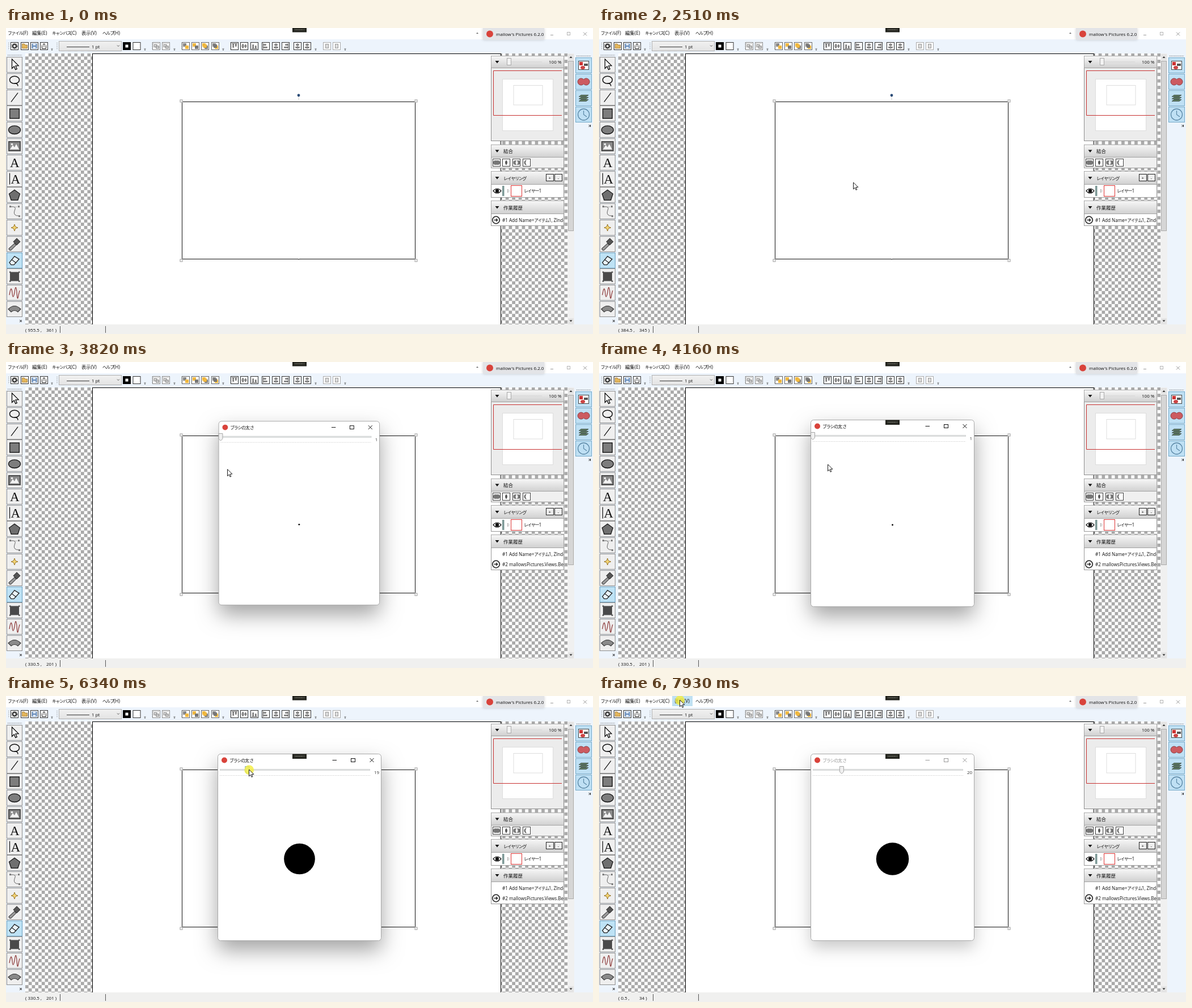
An HTML page with a canvas that plays this animation: 1035 px wide and 541 px high, repeating every 8000 ms.

```html
<!DOCTYPE html>
<html lang="ja">
<head>
<meta charset="utf-8">
<title>Brush size</title>
<style>
html, body { margin: 0; width: 100%; height: 100%; overflow: hidden; background: #fff; }
canvas { display: block; }
</style>
</head>
<body>
<canvas id="stage" width="1035" height="541"></canvas>
<script>
const W = 1035, H = 541, LOOP = 8000, STEP = 69.5;
const screen2d = document.getElementById('stage').getContext('2d');
let g = screen2d;

// ---------- helpers ----------
function box(x, y, w, h, fill, stroke, lw = 1) {
  if (fill) { g.fillStyle = fill; g.fillRect(x, y, w, h); }
  if (stroke) {
    g.strokeStyle = stroke; g.lineWidth = lw;
    g.strokeRect(x + lw / 2, y + lw / 2, w - lw, h - lw);
  }
}
function paint(fill, stroke, lw = 1) {
  if (fill) { g.fillStyle = fill; g.fill(); }
  if (stroke) { g.strokeStyle = stroke; g.lineWidth = lw; g.stroke(); }
}
function poly(pts, fill, stroke, lw) {
  g.beginPath();
  for (let i = 0; i < pts.length; i += 2) g.lineTo(pts[i], pts[i + 1]);
  if (fill) g.closePath();
  paint(fill, stroke, lw);
}
function oval(x, y, rx, ry, fill, stroke, lw) {
  g.beginPath();
  g.ellipse(x, y, rx, ry, 0, 0, 7);
  paint(fill, stroke, lw);
}
function curve(d, fill, stroke, lw, x = 0, y = 0) {
  g.save();
  g.translate(x, y);
  const p = new Path2D(d);
  if (fill) { g.fillStyle = fill; g.fill(p); }
  if (stroke) { g.strokeStyle = stroke; g.lineWidth = lw || 1; g.stroke(p); }
  g.restore();
}
function dots(x1, y1, x2, y2, color, gap = 1.5) {
  g.setLineDash([1.2, gap]);
  poly([x1, y1, x2, y2], null, color);
  g.setLineDash([]);
}
// Kana are set smaller and tighter than the rest, as in a UI font.
function text(s, x, y, size = 8.1, color = '#111') {
  g.fillStyle = color;
  for (const run of s.match(/[\u3040-\u30ff]+|[^\u3040-\u30ff]+/g)) {
    const kana = /[\u3040-\u30ff]/.test(run);
    g.font = `${kana ? size * 0.92 : size}px "Open Sans", "Noto Sans CJK JP", sans-serif`;
    g.letterSpacing = kana ? '-1.1px' : '0px';
    g.fillText(run, x, y + 3);
    x += g.measureText(run).width;
  }
  g.letterSpacing = '0px';
}
function shade(y1, y2, a, b) {
  const s = g.createLinearGradient(0, y1, 0, y2);
  s.addColorStop(0, a);
  s.addColorStop(1, b);
  return s;
}
function pointer(x, y, k = 0.72) {
  g.save();
  g.translate(x + 0.5, y);
  g.scale(k, k);
  poly([0, 0, 0, 16.5, 3.8, 12.9, 6.3, 18.6, 8.8, 17.5, 6.4, 11.9, 11.6, 11.6], '#fff', '#000', 1.25);
  g.restore();
}
function blackTab(y) {
  box(505, y, 25, 8.5, '#22231d');
  box(508, y + 2.5, 19, 3, '#3c3d36');
  dots(511, y + 4, 524, y + 4, '#85867c', 2);
}

// ---------- static window ----------
function checker() {
  const c = 5.76;
  box(34, 44, 956, 480, '#fff');
  g.save();
  g.beginPath();
  g.rect(34, 45, 956, 480);
  g.clip();
  g.fillStyle = '#a9a9a9';
  for (let r = 0; r < 84; r++)
    for (let i = (r + 1) % 2; i < 167; i += 2) g.fillRect(34 + i * c, 44.6 + r * c, c, c);
  g.restore();
}

function titleBar() {
  box(0, 0, W, 20, '#fff');
  text('ファイル(F)', 3, 9, 8.4);
  text('編集(E)', 46, 9, 8.4);
  text('キャンバス(C)', 81, 9, 8.4);
  text('表示(V)', 133, 9, 8.4);
  text('ヘルプ(H)', 170, 9, 8.4);
  blackTab(-1);
  poly([829, 10, 831, 8, 833, 10], '#555');
}

function toolBar() {
  box(0, 20, W, 25, '#edf4fc');
  g.save();
  g.shadowColor = 'rgba(0,0,0,.18)';
  g.shadowBlur = 5;
  box(841, 0, 108, 21, '#e3e4e7');
  g.restore();
  oval(853, 10.5, 6, 6, '#d9433b');
  text("mallow's Pictures 6.2.0", 864, 10.5, 8, '#111');
  poly([960, 12.5, 965, 12.5], null, '#999');
  box(989, 7, 6, 6, null, '#b5b5b5');
  curve('M0 0l6 6M6 0l-6 6', null, '#999', 1, 1018, 7.5);

  for (const x of [5, 90, 258, 310, 396]) dots(x, 26, x, 39, '#777', 2);
  for (const x of [81, 245, 297, 383, 546, 598]) {
    poly([x - 1.5, 36.5, x + 1.5, 36.5], null, '#555', 0.8);
    poly([x - 1.5, 38, x + 1.5, 38, x, 39.8], '#333');
  }
  const frame = (x, c = '#333') => box(x - 7, 25, 14, 14, '#fff', c);
  for (const x of [15, 33, 50, 67]) frame(x);
  oval(15, 32, 3, 3, null, '#333', 2);
  g.setLineDash([1.5, 1.5]);
  oval(15, 32, 4.6, 4.6, null, '#333', 1.4);
  g.setLineDash([]);
  curve('M0 0h4l1 2h4v6h-9z', '#e3b65c', '#8a6420', 0.7, 28.5, 28);
  box(45.5, 27.5, 9, 9, '#5d84b5');
  box(47.5, 28, 5, 3, '#dfe9f5');
  box(47.5, 33, 5, 3, '#dfe9f5');
  curve('M0 3v6h7v-6M3.5 6v-6M1.5 2l2-2l2 2', null, '#222', 1, 63.5, 27.5);

  box(93, 23, 111, 18, shade(23, 41, '#f1f1f1', '#e3e3e3'), '#b0b0b0');
  poly([107, 33.5, 147, 33.5], null, '#222', 0.9);
  text('1 pt', 151, 33, 8);
  poly([196, 30.5, 198, 32.5, 200, 30.5], null, '#444', 0.9);
  box(206, 25, 14, 14, '#000');
  box(210.5, 29.5, 5, 5, '#fff');
  frame(230.5);

  for (const x of [265, 282]) {
    frame(x, '#888');
    dots(x - 5, 27.5, x + 5, 27.5, '#777');
    box(x - 4.5, 29, 6, 5, '#ddd', '#888');
    box(x - 1, 31.5, 6, 5, '#ccc', '#888');
  }
  [317, 334, 351, 369].forEach((x, i) => {
    frame(x, '#666');
    box(x - 5, 27, 6, 6, i % 3 ? '#f0b840' : '#888');
    box(x - 1, 31, 6, 6, i % 3 ? '#777' : '#f0b840');
    if (i > 1) box(x - 3, 29, 6, 6, i === 3 ? '#777' : '#f0b840');
  });
  [403, 420, 438, 458, 476, 493, 514, 531].forEach((x, i) => {
    frame(x);
    g.save();
    g.translate(x, 32);
    if (i > 2) g.rotate(-Math.PI / 2);
    const e = i > 5 ? 0 : [-4.5, 0, 4.5][i % 3];
    const top = h => e < 0 ? -4.5 : e > 0 ? 4.5 - h : -h / 2;
    poly([-5, e, 5, e], null, '#444', 0.8);
    box(-3.5, top(7), 2.5, 7, '#aaa', '#555', 0.7);
    box(1, top(5), 2.5, 5, '#aaa', '#555', 0.7);
    g.restore();
  });
  for (const x of [566, 583]) {
    frame(x, '#aaa');
    box(x - 3, 28, 6, 8, '#ddd', '#999');
  }
}

function letter(x, y) {
  g.fillStyle = '#111';
  g.font = '23px "Liberation Serif", serif';
  g.fillText('A', x, y + 8);
}
function toolIcons() {
  const icons = [
    y => pointer(10, y - 10, 1),
    y => { oval(15, y - 2, 8.5, 6.5, null, '#111', 1.5); curve('M1 4q6 0 6 5', null, '#111', 1.4, 14, y); },
    y => poly([9, y + 8, 21, y - 8], null, '#111', 1.2),
    y => box(6, y - 9, 18, 18, '#7d7d7d', '#111', 1.3),
    y => oval(15, y, 10.5, 7.3, '#7d7d7d', '#111', 1.3),
    y => {
      box(4, y - 9, 22, 18, '#4a4a4a');
      box(6, y - 7, 18, 14, '#8a8a8a');
      poly([7, y + 5.5, 12, y - 2, 15, y + 2, 18, y - 4, 23, y + 5.5], '#f4f4f4');
      oval(10.5, y - 3.5, 1.8, 1.8, '#f4f4f4');
    },
    y => letter(7, y),
    y => { letter(8.5, y); poly([6.5, y - 10, 6.5, y + 10], null, '#111', 1.2); },
    y => {
      const p = [];
      for (let a = 0; a < 5; a++) p.push(15 + 10 * Math.sin(a * 1.2566), y + 0.8 - 10 * Math.cos(a * 1.2566));
      poly(p, '#6f6f6f', '#111', 1.2);
    },
    y => {
      curve('M-8 -8q13 -2 8 7q-3 9 8 9', null, '#666', 1, 15, y);
      poly([7, y - 8, 20, y - 8], null, '#999', 0.7);
      for (const [a, b] of [[-9, -10], [6, -10], [7, 7]]) box(15 + a, y + b, 3, 3, '#fff', '#777');
    },
    y => curve('M0 -6l1.6 4.4l4.4 1.6l-4.4 1.6l-1.6 4.4l-1.6 -4.4l-4.4 -1.6l4.4 -1.6z', '#f7d774', '#9c7a2c', 1, 15, y),
    y => { curve('M-1 -4l6 -6l6 6l-6 6z', '#555', '#222', 1, 14, y); curve('M1 -1l3 3l-9 9q-4 1 -4 -3z', '#999', '#222', 1, 14, y); },
    y => { curve('M-9 4l9 -11l8 5l-9 10h-5z', '#e9f4fb', '#222', 1.4, 15, y); poly([10, y - 1, 18, y + 5], null, '#222', 1.2); },
    y => {
      box(7, y - 8, 16, 16, '#4a4a4a');
      for (const a of [-9, 7]) for (const b of [-9, 7]) box(15 + a, y + b, 2.5, 2.5, '#555');
    },
    y => curve('M-9 4q3 -20 5 -4q1 14 4 0q2 -18 4 -2q1 20 3 6l2 -8', null, '#8a3434', 1.2, 15, y),
    y => curve('M-11 2q11 -11 22 0l-5 5q-6 -5 -12 0z', '#8a8a8a', '#333', 1.1, 15, y - 2)
  ];
  icons.forEach((icon, i) => {
    const y = 51 + 28.8 * i, on = i === 12;
    box(1, Math.round(y), 28, 28, on ? '#bee2f5' : '#efefef', on ? '#6c9fbd' : '#8d8d8d');
    icon(y + 14);
  });
}

function sideBars() {
  box(0, 45, 34, 480, '#edf4fc');
  dots(3, 48, 28, 48, '#555');
  toolIcons();
  box(1002, 45, 33, 480, '#edf4fc');
  dots(1006, 49.5, 1031, 49.5, '#555');
  for (let i = 0; i < 4; i++) box(1004, 52 + 29 * i, 29, 28, '#bfe0f4', '#73a9c8');
  box(1009, 58, 19, 16, '#fff', '#444');
  box(1011, 60, 6, 6, '#c33');
  box(1019, 63, 7, 4, '#555');
  oval(1017, 70, 4, 3, '#c44');
  oval(1014, 95, 6, 6, '#cc5b60', '#8c3a3f');
  oval(1023, 95, 6, 6, '#cc5b60', '#8c3a3f');
  box(1014, 91, 9, 8, '#cc5b60');
  for (const y of [128, 124, 120]) curve('M0 0l4 -3h13l-4 3z', '#5c7a60', '#3d4a40', 0.8, 1010, y + 1.5);
  oval(1018.5, 153, 10, 10, null, '#5a87a5', 1.3);
  poly([1018.5, 146, 1018.5, 153, 1024, 157], null, '#5a87a5', 1.2);
  for (const [x, y] of [[24, 518], [1027.5, 173]])
    curve('M0 -2l2 2l-2 2M3 -2v4', null, '#222', 1, x, y);

  box(990, 45, 12, 479, '#f0f0f0');
  box(991, 58, 10, 301, '#d6d6d6', '#ababab');
  box(991, 46, 10, 11, '#e4e4e4');
  box(991, 513, 10, 11, '#e4e4e4');
  poly([993.5, 53, 996, 50, 998.5, 53], '#333');
  poly([993.5, 516.5, 996, 519.5, 998.5, 516.5], '#333');
}

function page() {
  box(152, 45, 721, 490, '#fff', '#000');
  box(310, 130, 412, 279, null, '#111');
  for (const x of [309, 723]) for (const y of [129, 411]) box(x - 2.5, y - 2.5, 5, 5, '#fff', '#999');
  dots(516, 121, 516, 129, '#999');
  oval(516, 119, 2.4, 2.4, '#2b4c78');
  box(515.5, 408, 1.5, 2, '#777');
}

function header(y, h, label) {
  box(855, y, 129, h, shade(y, y + h, '#f8f8f8', '#cfcfcf'), '#999', 0.8);
  poly([862.5, y + h / 2 - 2, 869.5, y + h / 2 - 2, 866, y + h / 2 + 2.5], '#111');
  if (label) text(label, 877, y + h / 2 + 0.5, 8.5);
}
function panels() {
  box(855, 70, 129, 130, '#ececec', '#8d8d8d');
  header(49, 22);
  box(884, 59, 61, 2, '#dcdcdc');
  box(883, 53, 8, 13, '#f2f2f2', '#aaa');
  text('100 %', 957, 60, 8);
  box(875, 90, 90, 92, '#fff', '#ddd');
  box(894.5, 101, 52, 35.5, null, '#ddd');
  poly([980, 75.5, 859.5, 75.5, 859.5, 154.5, 980, 154.5], null, '#c83030');

  box(855, 228, 129, 20, '#f0f0f0', '#999');
  header(206, 23, '結合');
  for (const x of [865, 882, 900, 918]) box(x - 7, 231, 14, 14, '#fff', '#444');
  oval(863, 238, 4, 4, '#777');
  oval(867, 238, 4, 4, '#777');
  curve('M0 -4.5q4 4.5 0 9q-4 -4.5 0 -9z', '#555', null, 1, 882, 238);
  oval(898.5, 238, 4, 4, '#777');
  oval(902.5, 238, 4, 4, '#777');
  curve('M0 -4q4 4 0 8q-4 -4 0 -8z', '#fff', null, 1, 900.5, 238);
  curve('M0 -4.5a4.5 4.5 0 1 0 0 9q-4 -4.5 0 -9z', '#666', null, 1, 918, 238);

  box(855, 276, 129, 24, '#fff', '#999');
  header(253, 24, 'レイヤリング');
  for (const [x, s] of [[952, '+'], [967, '-']]) {
    box(x, 258, 14, 13, '#eee', '#222');
    text(s, x + (s === '+' ? 4.5 : 5.5), 264.5, 8);
  }
  curve('M-7 0q7 -8 14 0q-7 8 -14 0z', '#fff', '#111', 1.2, 866, 288);
  oval(866, 288, 3.2, 3.2, '#111');
  box(875, 279, 3.5, 18, '#7c9896');
  poly([884.5, 285, 884.5, 291, 887.5, 288], '#fff', '#999', 0.8);
  box(890, 278, 20, 20, '#fff', '#d33');
  text('レイヤー1', 913, 288, 8.4);
}

function buildScene() {
  const layer = document.createElement('canvas');
  layer.width = W;
  layer.height = H;
  g = layer.getContext('2d');
  checker();
  titleBar();
  toolBar();
  sideBars();
  page();
  panels();
  box(0, 524, W, 17, '#f0f0ef');
  for (const x of [95, 175]) box(x, 527, 1, 12, '#555');
  g = screen2d;
  return layer;
}

// ---------- motion ----------
// Each move: start time, then [step, x, y] keys.
const moves = [
  [370, [0, 814, 520], [1, 770, 484], [3, 600, 430], [6, 330, 388], [8, 180, 381], [10, 115, 394], [11, 102, 399]],
  [1200, [0, 98, 400], [3, 48, 408], [7, 16, 413]],
  [2230, [0, 32, 410], [1, 120, 384], [2, 290, 338], [3, 428.8, 293.4], [4, 448, 273], [6, 468, 245], [8, 458, 225], [11, 412, 205]],
  [3060, [0, 405, 199], [3, 391, 191], [5, 390, 189.7]],
  [4160, [0, 403, 181], [2, 424, 160], [4, 431, 144], [7, 404, 134], [11, 378, 130]],
  [5050, [0, 378, 130], [1, 383, 130], [3, 401, 130], [4, 410, 130], [6, 420, 130], [8, 426, 130]],
  [6340, [0, 428, 130]],
  [7090, [0, 340, 112], [1, 173.2, 72.4], [2, 106, 54], [4, 92, 42], [7, 118, 24], [10, 142, 7]]
];
const clicks = [[1830, 1900], [3540, 3610], [5050, 6890], [7930, LOOP]];
const OPEN = 3680;

function cursorAt(t) {
  const move = moves.findLast(m => m[0] <= t);
  if (!move) return null;
  const n = Math.floor((t - move[0]) / STEP), keys = move.slice(1);
  const i = keys.findIndex(k => k[0] > n);
  if (i < 0) return keys.at(-1).slice(1);
  const [a, b] = [keys[i - 1], keys[i]], f = (n - a[0]) / (b[0] - a[0]);
  return [a[1] + (b[1] - a[1]) * f, a[2] + (b[2] - a[2]) * f];
}

// Last page position under the pointer, one step late.
function coords(t) {
  if (t >= 7300) return [0.5, 34];
  for (let s = t - 70; s >= 370; s -= 70) {
    const [x, y] = cursorAt(s);
    const onDialog = s >= OPEN && x > 373 && x < 662 && y > 102 && y < 433;
    if (x > 152 && x < 855 && y > 45 && !onDialog)
      return [Math.round((x - 152) / 0.72 + 0.5) - 0.5, Math.round((y - 45) / 0.72)];
  }
  return [955.5, 361];
}

function brushSize(t) {
  if (t < 5050) return 1;
  const [x] = cursorAt(Math.min(t - 70, 6900));
  return Math.round((x - 377) / 2.68) + 1;
}

function history(rows) {
  const h = 5 + 18 * rows;
  box(855, 327, 129, h, '#fff', '#999');
  header(305, 24, '作業履歴');
  g.save();
  g.beginPath();
  g.rect(856, 328, 127, h);
  g.clip();
  text('#1 Add Name=アイテム1, ZIndex=0', 875, 340, 8.1);
  if (rows > 1) text('#2 mallowsPictures.Views.Behaviors', 875, 358, 8.1);
  g.restore();
  const y = 321.5 + 18 * rows;
  oval(864, y, 6.3, 6.3, '#fff', '#333', 1.8);
  curve('M-3.5 0h6M0 -2.5l2.7 2.5l-2.7 2.5', null, '#222', 1.3, 864, y);
}

function dialog(t) {
  const k = Math.floor((t - OPEN) / STEP), rest = 0.35 ** k, size = brushSize(t);
  const active = t < 7930, ink = active ? '#111' : '#999', end = size < 10 ? 647 : 642;
  const body = new Path2D(), outside = new Path2D();
  body.roundRect(373.5, 102.5, 288, 330, 5);
  outside.rect(0, 0, W, H);
  outside.addPath(body);

  g.save();
  g.globalAlpha = Math.min(1, 0.1 + 0.5 * k);
  if (k < 5) {
    g.translate(517.5 - 5.5 * rest, 267.5 - 2.5 * rest);
    g.scale(1 - 0.127 * rest, 1 - 0.127 * rest);
    g.translate(-517.5, -267.5);
  }
  // The shadow stays outside so that it cannot show through while fading in.
  g.save();
  g.clip(outside, 'evenodd');
  g.shadowColor = `rgba(0,0,0,${active ? 0.36 : 0.22})`;
  g.shadowBlur = active ? 37 : 29;
  g.shadowOffsetY = active ? 17 : 12;
  g.fillStyle = '#fff';
  g.fill(body);
  g.restore();
  g.fillStyle = '#fff';
  g.fill(body);
  g.strokeStyle = '#a8a8a8';
  g.lineWidth = 1;
  g.stroke(body);

  oval(385, 113.5, 5, 5, '#d9433b');
  text('ブラシの太さ', 394, 113.5, 8.5, ink);
  poly([575.5, 113.5, 583, 113.5], null, ink);
  box(608, 110, 8, 7, null, ink);
  curve('M0 0l7 7M7 0l-7 7', null, ink, 1, 641.5, 110);

  box(377, 129, end - 377, 3, '#e4e6e6', '#d3d5d5');
  dots(377, 140.5, end, 140.5, '#c4c4c4', 1.7);
  const x = 377 + (size - 1) * 2.68, held = t >= 5050 && t < 6890;
  poly([x - 3.5, 124.5, x + 3.5, 124.5, x + 3.5, 134, x, 137.5, x - 3.5, 134, x - 3.5, 124.5],
    held ? '#d8ecfb' : '#f0f0f0', held ? '#6f9fc4' : '#a5a5a5');
  text(String(size), size < 10 ? 653.5 : 649, 135, 8, '#333');
  oval(517.5, 288, size * 1.44, size * 1.44, '#000');
  if (k >= 3) blackTab(102.5);
  g.restore();
}

const scene = buildScene();

function draw(t) {
  g.drawImage(scene, 0, 0);
  history(t >= 3750 ? 2 : 1);

  const [px, py] = coords(t);
  text('(', 34, 533.5, 8);
  text(px.toFixed(1) + ' ,', 38.5, 533.5, 8);
  text(py + ' )', 71, 533.5, 8);

  if (t >= 3610) oval(548, 274.5, 1.6, 1.6, '#fff', '#333');
  if (t >= OPEN) dialog(t);

  const at = cursorAt(t);
  if (!at) return;
  const [x, y] = at;
  if (x > 129 && x < 165 && y < 18) {
    box(129, 0, 36, 18, '#bfe0f2');
    text('表示(V)', 133, 9, 8.4);
  }
  if (clicks.some(c => t >= c[0] && t < c[1])) oval(x + 0.7, y + 0.7, 8.4, 8.4, 'rgba(245,238,60,.8)');
  pointer(x, y);
}

function tick() {
  draw(performance.now() % LOOP);
  requestAnimationFrame(tick);
}
tick();
</script>
</body>
</html>
```
